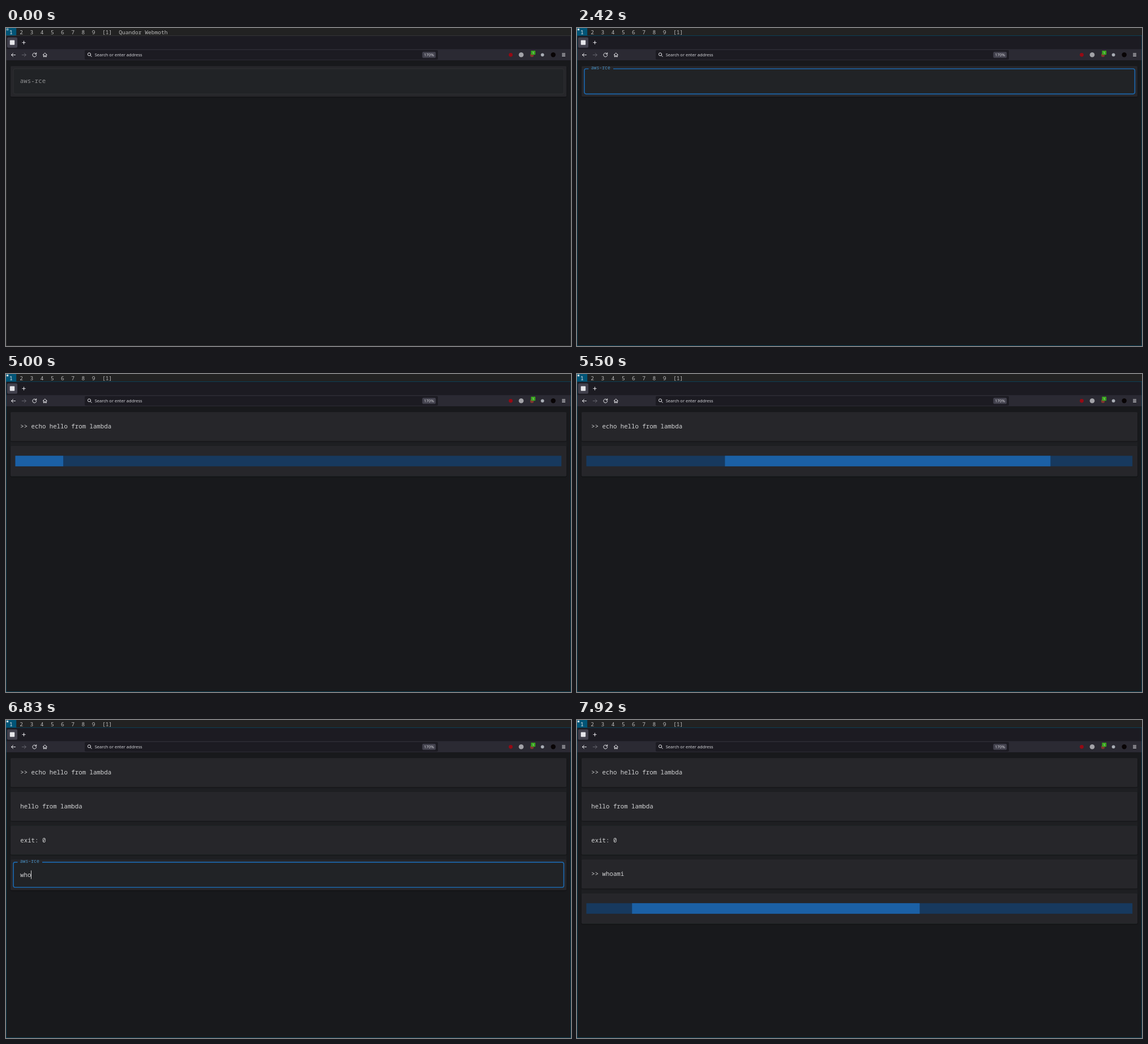
Write an HTML page that moves like this. It is 998 px wide and 561 px high and loops after 8 s.

```html
<!DOCTYPE html>
<html lang="en">
<head>
<meta charset="utf-8">
<title>Remote shell</title>
<style>
  html, body { margin: 0; width: 100%; height: 100%; overflow: hidden; background: #18191c; }
  svg { display: block; width: 998px; height: 561px; }
  text { white-space: pre; }
  .bar { font: 9.6px "Noto Sans Mono", monospace; fill: #bbb; }
  .ui { font: 7.5px "Noto Sans", sans-serif; fill: #d5d5da; }
  .mono { font: 10.72px "Noto Sans Mono", monospace; fill: #d2d3d4; }
  .field { letter-spacing: .07px; }
  .icon { fill: none; stroke: #fbfbfe; stroke-width: .9; stroke-linecap: round; stroke-linejoin: round; }
</style>
</head>
<body>
<svg viewBox="0 0 998 561">
  <defs>
    <filter id="shadow" x="-2%" y="-10%" width="104%" height="130%">
      <feDropShadow dx="0" dy="1" stdDeviation=".8" flood-color="#000" flood-opacity=".45"/>
    </filter>
  </defs>
  <rect width="998" height="561" fill="#18191c"/>

  <!-- window manager bar -->
  <rect width="998" height="13.5" fill="#222"/>
  <rect width="18.2" height="13.5" fill="#057"/>
  <g id="tags" class="bar" text-anchor="middle"></g>
  <text class="bar" x="170" y="10.6">[1]</text>
  <text id="title" class="bar" x="199.2" y="10.6">Quandor Webmoth</text>
  <rect id="marker" x="1.3" y="1.3" width="2.6" height="2.6" stroke="#eee" stroke-width=".6"/>

  <!-- browser -->
  <rect y="13.5" width="998" height="23.7" fill="#1c1b22"/>
  <rect y="37.2" width="998" height="20" fill="#2b2a33"/>
  <rect y="57" width="998" height=".5" fill="#131217"/>
  <rect x="2" y="16.5" width="18" height="18.2" rx="2" fill="#42414d"/>
  <rect x="6.8" y="21.4" width="8.4" height="8.4" rx="1" fill="#e6e6ea"/>
  <rect x="139" y="39" width="624" height="16.8" rx="2" fill="#1c1b22"/>
  <rect x="735.3" y="42" width="23.8" height="10.8" rx="2" fill="#42414d"/>
  <text class="ui" x="156.7" y="50.1">Search or enter address</text>
  <text class="ui" x="747.2" y="50.4" text-anchor="middle" style="font-size:7px">170%</text>
  <g class="icon">
    <path d="M28.8 25.7h5.4M31.5 23v5.4"/>
    <path d="M16.5 47.5h-7m3-3l-3 3 3 3"/>
    <path d="M28.3 47.5h7m-3-3l3 3-3 3" stroke="#6d6c75"/>
    <path d="M53 45.4a3.4 3.4 0 1 0 .7 2.4M53.7 43.6v2.5h-2.5"/>
    <path d="M65.3 47.3l3.5-3.3 3.5 3.3M66.3 46.8v4h1.6v-2h1.8v2h1.6v-4"/>
    <path d="M149 48.4l2.2 2.2"/>
    <circle cx="147" cy="46.4" r="2.6"/>
    <path d="M982.5 45h5M982.5 47.3h5M982.5 49.6h5"/>
  </g>
  <circle cx="891.5" cy="47.3" r="3.4" fill="#960a14"/>
  <circle cx="910" cy="47.3" r="4.3" fill="#a2a2a7"/>
  <circle cx="929" cy="48" r="3.2" fill="#80352f"/>
  <rect x="927.3" y="40" width="7.8" height="7.2" rx=".8" fill="#39a51d"/>
  <text class="ui" x="931.2" y="46" text-anchor="middle" style="font-size:6px">1</text>
  <circle cx="947.6" cy="47.3" r="2.9" fill="#a8acb4"/>
  <circle cx="966.6" cy="47.3" r="4.2" fill="#080405"/>

  <g id="page"></g>
  <rect id="frame" x=".25" y="13.4" width="997.5" height="547.3" fill="none" stroke-width=".6"/>
</svg>
<script>
const $ = id => document.getElementById(id);
const LOOP = 8000, TICK = 1000 / 12, LAST = LOOP / TICK - 1;
const TOP = 67.2, ROW = 59.65;
const clamp = (v, lo = 0, hi = 1) => Math.min(hi, Math.max(lo, v));
const lerp = (a, b, k) => a + (b - a) * k;
const mix = (a, b, k) => `rgb(${a.map((v, i) => Math.round(lerp(v, b[i], k)))})`;

function bezier(x1, y1, x2, y2) {
  const curve = (a, b, u) => 3 * a * u * (1 - u) ** 2 + 3 * b * u * u * (1 - u) + u ** 3;
  return x => {
    if (x <= 0 || x >= 1) return clamp(x);
    let lo = 0, hi = 1;
    for (let i = 0; i < 24; i++) {
      const mid = (lo + hi) / 2;
      if (curve(x1, x2, mid) < x) lo = mid; else hi = mid;
    }
    return curve(y1, y2, lo);
  };
}
const easeLong = bezier(.65, .815, .735, .395);
const easeShort = bezier(.165, .84, .44, 1);
const easeOut = bezier(0, 0, .2, 1);

// The tick at which each character is typed
const commands = [
  { text: 'echo hello from lambda',
    keys: [32, 33, 34, 35, 36, 36, 38, 40, 42, 44, 46, 47, 48, 49, 50, 51, 52, 53, 54, 56, 58, 59] },
  { text: 'whoami', keys: [81, 82, 82, 87, 88, 89] }
];
const typed = ({ text, keys }, tick) => text.slice(0, keys.filter(k => k <= tick).length);

const rect = (x, y, w, h, fill, more = '') =>
  `<rect x="${x}" y="${y}" width="${w}" height="${h}" fill="${fill}" ${more}/>`;
const escape = s => s.replace(/>/g, '&gt;');
const panel = h => rect(8, TOP, 982, h, '#26282b', 'rx="2" filter="url(#shadow)"');
const atRow = (row, body) => `<g transform="translate(0 ${row * ROW})">${body}</g>`;

const line = s => panel(51) + `<text class="mono" x="25.3" y="96.3">${escape(s)}</text>`;

function progress(ms) {
  const x = 16.5, y = TOP + 17.4, w = 964.6, h = 18.6;
  const strip = (left, right) => {
    const a = clamp(left), b = clamp(right);
    return b > a ? rect(x + a * w, y, (b - a) * w, h, '#1b60a5') : '';
  };
  const e1 = easeLong(ms / 1260), e2 = easeShort((ms - 1150) / 1260);
  return panel(53.6) + rect(x, y, w, h, '#17395e') +
    strip(lerp(-.35, 1, e1), lerp(0, 1.9, e1)) +
    strip(lerp(-2, 1.07, e2), lerp(0, 1.08, e2));
}

// ms counts from the moment of focus; negative means unfocused
function field(ms, value, caret) {
  const k = easeOut(ms / 200), on = ms >= 0;
  const gap = 20.5 + 43.5 * clamp((ms - 50) / 100);
  const x = 24.9 + value.length * 6.5;
  const outline = `<path d="M${gap} 72H982.3a3 3 0 0 1 3 3V113.3a3 3 0 0 1 -3 3H16a3 3 0 0 1 -3 -3V75a3 3 0 0 1 3 -3H20.5"
    fill="none" stroke="${on ? '#1c66aa' : '#303134'}" stroke-width="${on ? 1.7 : .9}"/>`;
  const label = `<text class="mono field" style="fill:${mix([143, 144, 146], [70, 142, 192], k)}"
    transform="translate(24.7 ${lerp(97.3, 72.9, k)}) scale(${lerp(1, .75, k)})">aws-rce</text>`;
  return panel(54) + rect(13, 72, 972.3, 44.3, '#212326', 'rx="3"') + outline + label +
    `<text class="mono field" x="24.9" y="97.6">${value}</text>` +
    (caret ? rect(x - .4, 86.5, .9, 15, '#e4e4e4') : '');
}

function page(tick) {
  const t = tick * TICK;
  const [first, second] = commands;
  if (tick < 60) {
    const caret = tick >= 15 && (tick < 29 || tick >= 32);
    return [field(t - 1250, typed(first, tick), caret)];
  }
  const rows = [line('>> ' + first.text)];
  if (tick >= 68) rows.push(line('hello from lambda'));
  if (tick < 75) return [...rows, progress(t - 4953)];
  rows.push(line('exit: 0'));
  if (tick < 91) return [...rows, field(t - 6216, typed(second, tick), true)];
  return [...rows, line('>> ' + second.text), progress(t - 7554)];
}

let shown = -1;
function draw(time) {
  // ticks fall on the nearest hundredth of a second, so allow a few ms
  const tick = Math.min(LAST, Math.floor((time % LOOP + 4) / TICK));
  if (tick === shown) return;
  shown = tick;
  const active = tick >= 14;
  $('title').setAttribute('visibility', active ? 'hidden' : 'visible');
  $('marker').setAttribute('fill', active ? '#eee' : 'none');
  $('frame').setAttribute('stroke', active ? '#057' : '#444');
  const rows = page(tick);
  const back = rows.length > 1 ? rect(8, 69, 982, (rows.length - 1) * ROW, '#1e1f22') : '';
  $('page').innerHTML = back + rows.map((body, i) => atRow(i, body)).join('');
}

$('tags').innerHTML = Array.from({ length: 9 }, (_, i) =>
  `<text x="${9 + i * 18.2}" y="10.6" ${i ? '' : 'style="fill:#eee"'}>${i + 1}</text>`).join('');

const start = performance.now();
function loop() {
  draw(performance.now() - start);
  requestAnimationFrame(loop);
}
loop();
</script>
</body>
</html>
```
